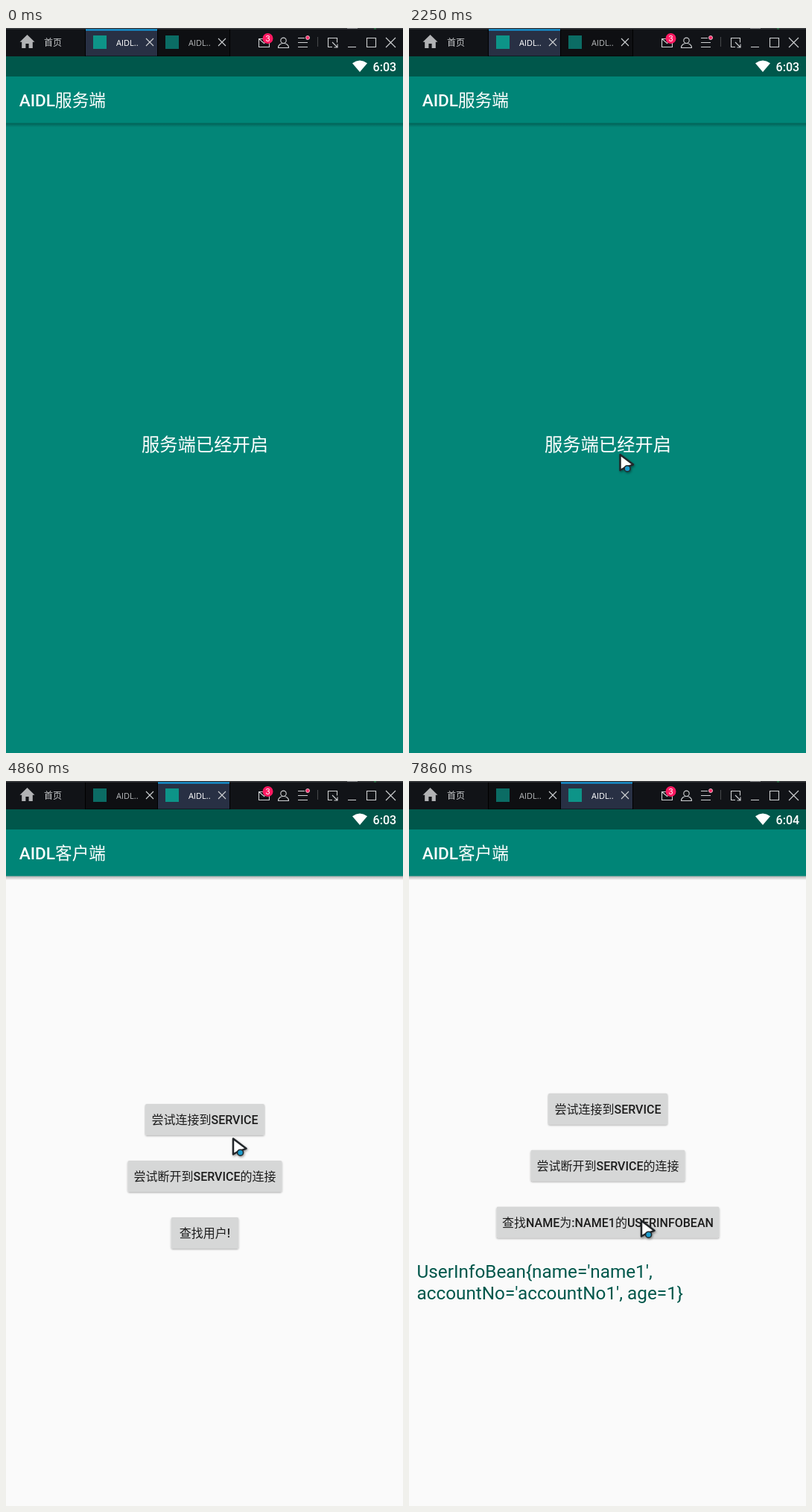
These frames come from a looping animation (533 px wide and 972 px high, 8 s). An HTML page:

```html
<!DOCTYPE html>
<html lang="zh">
<head>
<meta charset="utf-8">
<title>AIDL</title>
<style>
  html, body { margin: 0; width: 100%; height: 100%; overflow: hidden; background: #fafafa; }
  svg { display: block; width: 100vw; height: 100vh; }
  text { font-family: Roboto, "Noto Sans CJK SC", "Noto Sans CJK", sans-serif; }
  .med { font-weight: 500; }
  .cjk { font-weight: 400; }
  .mid { text-anchor: middle; }
  .tab text { font: 11px "Open Sans", sans-serif; fill: #b4b6b8; }
  .tab .face { fill: #0e0f12; }
  .tab .icon { fill: #0b6c64; }
  .tab .bar { fill: none; }
  .tab.on text { fill: #fff; }
  .tab.on .face { fill: #283044; }
  .tab.on .icon { fill: #0d9488; }
  .tab.on .bar { fill: #12a0e6; }
  .line { fill: none; stroke: #cfd1d3; stroke-width: 1.1; }
  .big { font-size: 24.3px; }
  .btn rect { fill: #d6d7d7; filter: url(#lift); }
  .btn text { font-size: 16px; fill: #1c1c1c; }
</style>
</head>
<body>
<svg viewBox="0 0 533 972" preserveAspectRatio="none">
  <defs>
    <filter id="lift" x="-10%" y="-20%" width="120%" height="150%">
      <feDropShadow dx="0" dy="1.3" stdDeviation="1" flood-color="#000" flood-opacity=".35"/>
    </filter>
    <filter id="soft" x="-40%" y="-40%" width="190%" height="190%">
      <feDropShadow dx="1" dy="1.5" stdDeviation="1.5" flood-color="#000" flood-opacity=".4"/>
    </filter>
    <linearGradient id="shade" x2="0" y2="1">
      <stop offset="0" stop-color="#000" stop-opacity=".32"/>
      <stop offset="1" stop-color="#000" stop-opacity="0"/>
    </linearGradient>
  </defs>

  <rect id="page" width="533" height="972"/>
  <g id="server"></g>
  <g id="client"></g>

  <rect y="127" width="533" height="6" fill="url(#shade)"/>
  <rect y="65" width="533" height="62.5" fill="#008577"/>
  <rect y="38" width="533" height="27" fill="#00574b"/>
  <path d="M465 47.2Q475 39.8 485 47.2L475 59Z" fill="#fff"/>
  <g id="head"></g>

  <rect width="533" height="38" fill="#111317"/>
  <rect width="533" height="1.6" fill="#3b3d3f"/>
  <path d="M458 .5h14" stroke="#8a8c8e"/>
  <path d="M494 1h3" stroke="#2f9a55"/>
  <path d="M28.5 9L38.5 18.7H35.8V27H30.6V21H26.4V27H21.2V18.7H18.5Z" fill="#b2b3b5"/>
  <text x="51" y="24" font-size="12" fill="#c6c8ca">首页</text>
  <g id="tabs"></g>
  <g class="line">
    <path d="M339.5 14.5h14v11h-14zl7 6 7-6"/>
    <circle cx="372.5" cy="16.8" r="3.7"/>
    <path d="M365.5 26.5c0-8 14-8 14 0z"/>
    <path d="M392 13.5h9M392 19.5h13M392 25.5h13"/>
    <path d="M418.5 12v13" stroke="#46484b"/>
    <path d="M438 25.5h-5.5v-12h12v6M438 19l7 7M445 21.5V26h-4.5"/>
    <path d="M459 25.5h11M484.5 13.5h12v12h-12z"/>
    <path d="M510 13l13 13m0-13l-13 13"/>
  </g>
  <circle cx="351.5" cy="14" r="7" fill="#ff1a62"/>
  <text class="mid" x="351.5" y="18" font-size="11" fill="#fff">3</text>
  <circle cx="405" cy="13" r="2.5" fill="#ff2a68" stroke="#f0c8d4" stroke-width=".9"/>

  <g id="cursor">
    <g id="fancy" filter="url(#soft)">
      <path d="M2 2.5V23.5L8 20L19.5 15.8Z" fill="#fff" stroke="#23272a" stroke-width="2.5" stroke-linejoin="round"/>
      <circle cx="11.6" cy="21.2" r="4" fill="#1a9bcb" stroke="#23272a" stroke-width="1.6"/>
    </g>
    <path id="plain" d="M.5.5V16.4L4.1 13L6.6 18.7L9 17.7L6.5 12.2H11.6Z" fill="#fff" stroke="#000"/>
  </g>
</svg>

<script>
const LOOP = 8000, STEP = 30;
const SWITCH = 4200, CONNECTED = 5130, MINUTE = 5490, FOUND = 7410;
const $ = id => document.getElementById(id);

// Pointer paths: [ms, x, y]
const overServer = [
  [240, 500, 142], [570, 325, 500], [900, 156, 594], [1260, 187, 547], [1590, 314, 578],
  [1950, 179, 571], [2250, 281.5, 569.5], [2430, 336, 577], [2640, 267, 567], [3000, 508, 222]
];
const overClient = [
  [3840, 469, 36], [4110, 258, 19], [4290, 254, 19], [4410, 278, 168], [4590, 334, 385],
  [4740, 318, 483], [4860, 303, 477], [4920, 294, 460], [5130, 294, 460], [5430, 402, 543],
  [5610, 400, 682], [6060, 282, 634], [6210, 196, 670], [6360, 216, 711], [6690, 342, 698],
  [7080, 284, 606], [7410, 284, 606], [7860, 310, 587]
];

const spans = s => s.replace(/[\u4e00-\u9fff]+/g, '<tspan class="cjk">$&</tspan>');
const button = (id, y, w, label) => `<g class="btn" id="${id}">
  <rect x="${267 - w / 2}" y="${y}" width="${w}" height="41.5" rx="2"/>
  <text class="med mid" x="267" y="${y + 27}">${spans(label)}</text></g>`;
const title = (id, label) =>
  `<text id="${id}" class="med" x="17.7" y="105" font-size="22.6" fill="#fff">${spans(label)}</text>`;
const tab = (id, x) => `<g class="tab" id="${id}" transform="translate(${x} 0)">
  <rect x="-1" y="2" width="98" height="36"/>
  <rect class="face" y="2" width="96" height="35.5"/>
  <rect class="bar" y="1.5" width="96" height="2"/>
  <rect class="icon" x="10" y="10" width="18" height="18"/>
  <text x="41" y="24">AIDL..</text>
  <path class="line" d="M81 14l10 10m0-10l-10 10"/></g>`;

$('tabs').innerHTML = tab('tabA', 107) + tab('tabB', 204);
$('head').innerHTML = title('titleA', 'AIDL服务端') + title('titleB', 'AIDL客户端') +
  '<text id="clock" class="med" x="492.6" y="58" font-size="16" fill="#fff"></text>';
$('server').innerHTML = '<text class="big mid" x="267" y="567" fill="#fff">服务端已经开启</text>';
$('client').innerHTML = `<g id="upper">
  ${button('link', 433, 160, '尝试连接到SERVICE')}
  ${button('unlink', 509, 207, '尝试断开到SERVICE的连接')}
  ${button('find', 585, 90.5, '查找用户!')}
  ${button('findName', 585, 299, '查找NAME为:NAME1的USERINFOBEAN')}</g>
  <g class="big" fill="#00574b">
    <text id="ok" class="mid" x="267" y="680">连接成功</text>
    <g id="info"><text x="10.5" y="666">UserInfoBean{name='name1',</text>
    <text x="10.5" y="694.5">accountNo='accountNo1', age=1}</text></g>
  </g>`;

const show = (id, on) => $(id).style.display = on ? '' : 'none';

// Smooth curve through the points that never overshoots
function slope(p, i, k) {
  if (i < 1 || i >= p.length - 1) return 0;
  const a = (p[i][k] - p[i - 1][k]) / (p[i][0] - p[i - 1][0]);
  const b = (p[i + 1][k] - p[i][k]) / (p[i + 1][0] - p[i][0]);
  return a * b > 0 ? 2 * a * b / (a + b) : 0;
}

function along(p, t, k) {
  let i = 0;
  while (i < p.length - 2 && t >= p[i + 1][0]) i++;
  const h = p[i + 1][0] - p[i][0], u = Math.min(1, (t - p[i][0]) / h), v = 1 - u;
  return p[i][k] * (1 + 2 * u) * v * v + p[i + 1][k] * u * u * (3 - 2 * u) +
    h * u * v * (slope(p, i, k) * v - slope(p, i + 1, k) * u);
}

function pathAt(t) {
  if (t >= 3840) return overClient;
  return t >= 240 && t < 3000 ? overServer : null;
}

function draw(now) {
  const t = Math.floor(now % LOOP / STEP) * STEP;
  const client = t >= SWITCH, found = t >= FOUND;
  $('page').setAttribute('fill', client ? '#fafafa' : '#038678');
  $('tabA').classList.toggle('on', !client);
  $('tabB').classList.toggle('on', client);
  show('server', !client);
  show('titleA', !client);
  show('client', client);
  show('titleB', client);
  show('ok', t >= CONNECTED && !found);
  show('info', found);
  show('find', !found);
  show('findName', found);
  $('upper').setAttribute('transform', `translate(0 ${found ? -14.3 : 0})`);
  $('clock').textContent = t < MINUTE ? '6:03' : '6:04';

  const path = pathAt(t);
  show('cursor', path);
  if (path) {
    const x = along(path, t, 1), y = along(path, t, 2);
    $('cursor').setAttribute('transform', `translate(${x.toFixed(1)} ${y.toFixed(1)})`);
    show('plain', y < 38);
    show('fancy', y >= 38);
  }
}

function tick() {
  draw(performance.now());
  requestAnimationFrame(tick);
}
tick();
</script>
</body>
</html>
```
